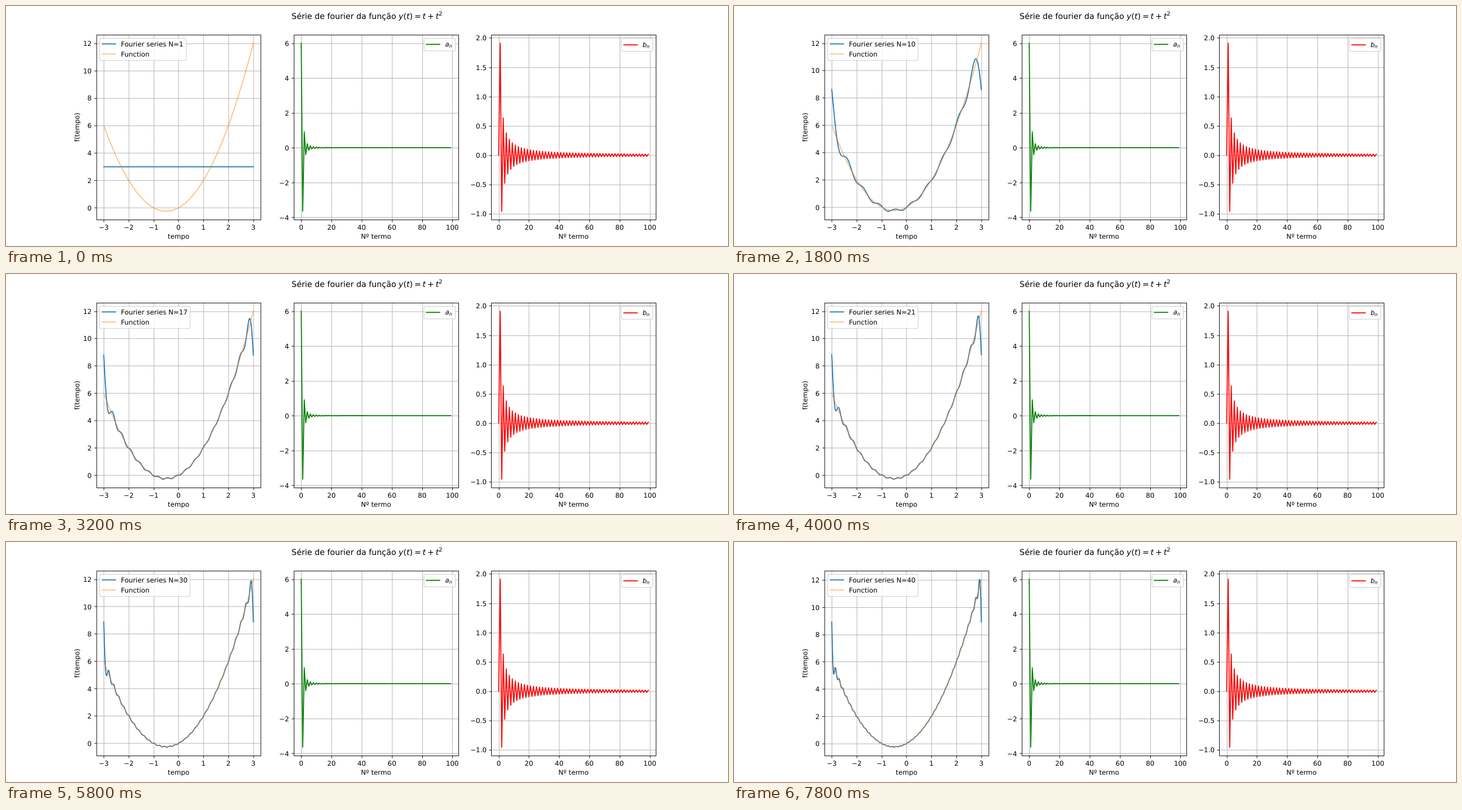
An HTML page with a canvas that plays this animation: 1280 px wide and 427 px high, repeating every 8 s.

```html
<!DOCTYPE html>
<html lang="pt">
<head>
<meta charset="utf-8">
<title>Série de Fourier</title>
<style>
  html, body { margin: 0; width: 100%; height: 100%; overflow: hidden; background: #fff; }
  canvas { display: block; }
</style>
</head>
<body>
<canvas id="stage" width="1280" height="427"></canvas>
<script>
const ctx = document.getElementById('stage').getContext('2d');

// The figure is laid out on a 1500 x 500 sheet and scaled to the stage.
const SHEET_W = 1500, SHEET_H = 500;
const EM = 13.889, TITLE_EM = 16.667, PT = 100 / 72;
const TOP = 60, BOTTOM = 445, AXES_W = 341.91, AXES_STEP = 410.29, AXES_LEFT = 187.5;
const TICK = 3.5 * PT, MARGIN = 0.05;
const STEP_MS = 200, STEPS = 40, SAMPLES = 600, TERMS = 100;
const BLUE = '#1f77b4', ORANGE = 'rgba(255,127,14,0.5)', GREEN = '#008000', RED = '#ff0000';

const sign = n => n % 2 ? -1 : 1;
const coefA = n => n ? sign(n) * 36 / (n * Math.PI) ** 2 : 6;
const coefB = n => n ? -sign(n) * 6 / (n * Math.PI) : 0;
const parabola = t => t + t * t;

function series(t, count) {
  let sum = coefA(0) / 2;
  for (let n = 1; n < count; n++) {
    const w = n * Math.PI * t / 3;
    sum += coefA(n) * Math.cos(w) + coefB(n) * Math.sin(w);
  }
  return sum;
}

const range = (from, to, step = 1) =>
  Array.from({ length: Math.round((to - from) / step) + 1 }, (_, i) => from + i * step);
const times = range(0, SAMPLES).map(i => -3 + 6 * i / SAMPLES);
const indices = range(0, TERMS - 1);
const plot = (xs, f) => xs.map(x => [x, f(x)]);
const snap = v => Math.floor(v + 0.5) + 0.5;
const label = (v, digits) => v.toFixed(digits).replace('-', '\u2212');

function stroke(points, color, width) {
  ctx.beginPath();
  points.forEach(([x, y]) => ctx.lineTo(x, y));
  ctx.strokeStyle = color;
  ctx.lineWidth = width * PT;
  ctx.stroke();
}

function text(str, x, y, { align = 'left', size = EM, italic = false } = {}) {
  ctx.font = `${italic ? 'italic ' : ''}${size}px "DejaVu Sans", sans-serif`;
  ctx.textAlign = align;
  ctx.fillStyle = '#000';
  ctx.fillText(str, x, y);
}

function makeAxes(column, curves) {
  const left = AXES_LEFT + column * AXES_STEP;
  const points = curves.flat();
  const scale = (values, start, length) => {
    const min = Math.min(...values), max = Math.max(...values);
    const pad = (max - min) * MARGIN;
    return v => start + (v - min + pad) / (max - min + 2 * pad) * length;
  };
  return {
    left,
    right: left + AXES_W,
    x: scale(points.map(p => p[0]), left, AXES_W),
    y: scale(points.map(p => p[1]), BOTTOM, TOP - BOTTOM),
  };
}

function drawAxes(axes, { curves, colors, xTicks, yTicks, digits = 0, xLabel }) {
  const { left, right } = axes;
  ctx.save();
  ctx.beginPath();
  ctx.rect(left, TOP, AXES_W, BOTTOM - TOP);
  ctx.clip();
  ctx.lineCap = 'square';
  ctx.lineJoin = 'round';
  for (const v of xTicks) {
    const x = snap(axes.x(v));
    stroke([[x, TOP], [x, BOTTOM]], '#b0b0b0', 0.8);
  }
  for (const v of yTicks) {
    const y = snap(axes.y(v));
    stroke([[left, y], [right, y]], '#b0b0b0', 0.8);
  }
  curves.forEach((curve, i) => {
    const flat = curve.every(p => p[1] === curve[0][1]);
    const toY = v => flat ? Math.round(axes.y(v)) : axes.y(v);
    stroke(curve.map(([x, y]) => [axes.x(x), toY(y)]), colors[i], 1.5);
  });
  ctx.restore();

  for (const v of xTicks) {
    const x = snap(axes.x(v));
    stroke([[x, BOTTOM + 0.5], [x, BOTTOM + 0.5 + TICK]], '#000', 0.8);
    text(label(v, 0), axes.x(v), 466, { align: 'center' });
  }
  for (const v of yTicks) {
    const y = snap(axes.y(v));
    stroke([[snap(left) - TICK, y], [snap(left), y]], '#000', 0.8);
    text(label(v, digits), left - 2 * TICK, axes.y(v) + 5.5, { align: 'right' });
  }
  ctx.strokeStyle = '#000';
  ctx.lineWidth = 0.8 * PT;
  ctx.strokeRect(snap(left), snap(TOP), snap(right) - snap(left), BOTTOM - TOP);
  text(xLabel, (left + right) / 2, 485.3, { align: 'center' });
}

function legendBox(left, right, bottom) {
  const x = snap(left), y = 67.5;
  ctx.beginPath();
  ctx.roundRect(x, y, snap(right) - x, bottom - y, 0.2 * EM);
  ctx.fillStyle = 'rgba(255,255,255,0.8)';
  ctx.fill();
  ctx.strokeStyle = 'rgba(204,204,204,0.8)';
  ctx.lineWidth = PT;
  ctx.stroke();
}

function legendLine(x, y, color) {
  ctx.lineCap = 'square';
  stroke([[x, y], [x + 2 * EM, y]], color, 1.5);
  ctx.lineCap = 'butt';
}

function seriesLegend(axes, count) {
  const left = axes.left + 0.5 * EM, handle = left + 0.4 * EM, textX = handle + 2.8 * EM;
  const textW = count === 1 ? 130 : count < 10 ? 129 : 138;
  legendBox(left, textX + textW + 0.4 * EM, 113.5);
  legendLine(handle, 79, BLUE);
  legendLine(handle, 100, ORANGE);
  text(`Fourier series N=${count}`, textX, 84);
  text('Function', textX, 105);
}

function coefLegend(axes, letter, color, drop) {
  const right = axes.right - 0.5 * EM, textX = right - 0.4 * EM - 15;
  const handle = textX - 2.8 * EM, baseline = 84.5 + drop;
  legendBox(handle - 0.4 * EM, right, 93.5 + drop);
  legendLine(handle, 80 + drop, color);
  text(letter, textX, baseline, { italic: true });
  text('n', textX + 0.62 * EM, baseline + 2.3, { italic: true, size: 0.7 * EM });
}

function drawTitle() {
  const y = 26.5, gap = 0.195 * TITLE_EM;
  let x = 593.4;
  const put = (str, italic = false, size = TITLE_EM, rise = 0) => {
    text(str, x, y - rise, { size, italic });
    x += ctx.measureText(str).width;
  };
  const operator = str => { x += gap; put(str); x += gap; };
  put('Série de fourier da função ');
  put('y', true);
  put('(');
  put('t', true);
  put(')');
  operator('=');
  put('t', true);
  operator('+');
  put('t', true);
  put('2', false, 0.7 * TITLE_EM, 6.4);
}

function drawFunction(count) {
  const curves = [plot(times, t => series(t, count)), plot(times, parabola)];
  const axes = makeAxes(0, curves);
  drawAxes(axes, {
    curves, colors: [BLUE, ORANGE], xTicks: range(-3, 3), yTicks: range(0, 12, 2), xLabel: 'tempo',
  });
  seriesLegend(axes, count);
  ctx.save();
  ctx.translate(152, (TOP + BOTTOM) / 2);
  ctx.rotate(-Math.PI / 2);
  text('f(tempo)', 0, 0, { align: 'center' });
  ctx.restore();
}

function drawCoefficients(column, coef, letter, color, yTicks, digits, drop) {
  const curves = [plot(indices, coef)];
  const axes = makeAxes(column, curves);
  drawAxes(axes, {
    curves, colors: [color], xTicks: range(0, 100, 20), yTicks, digits, xLabel: 'Nº termo',
  });
  coefLegend(axes, letter, color, drop);
}

function draw(count) {
  ctx.setTransform(1280 / SHEET_W, 0, 0, 427 / SHEET_H, 0, 0);
  ctx.textRendering = 'geometricPrecision';
  ctx.fillStyle = '#fff';
  ctx.fillRect(0, 0, SHEET_W, SHEET_H);
  drawTitle();
  drawFunction(count);
  drawCoefficients(1, coefA, 'a', GREEN, range(-4, 6, 2), 0, 0);
  drawCoefficients(2, coefB, 'b', RED, range(-1, 2, 0.5), 1, 1);
}

const start = performance.now();
let shown = 0;

function tick(now) {
  const elapsed = Math.max(0, now - start);
  const count = Math.floor(elapsed / STEP_MS) % STEPS + 1;
  if (count !== shown) draw(shown = count);
  requestAnimationFrame(tick);
}
tick(start);
</script>
</body>
</html>
```
